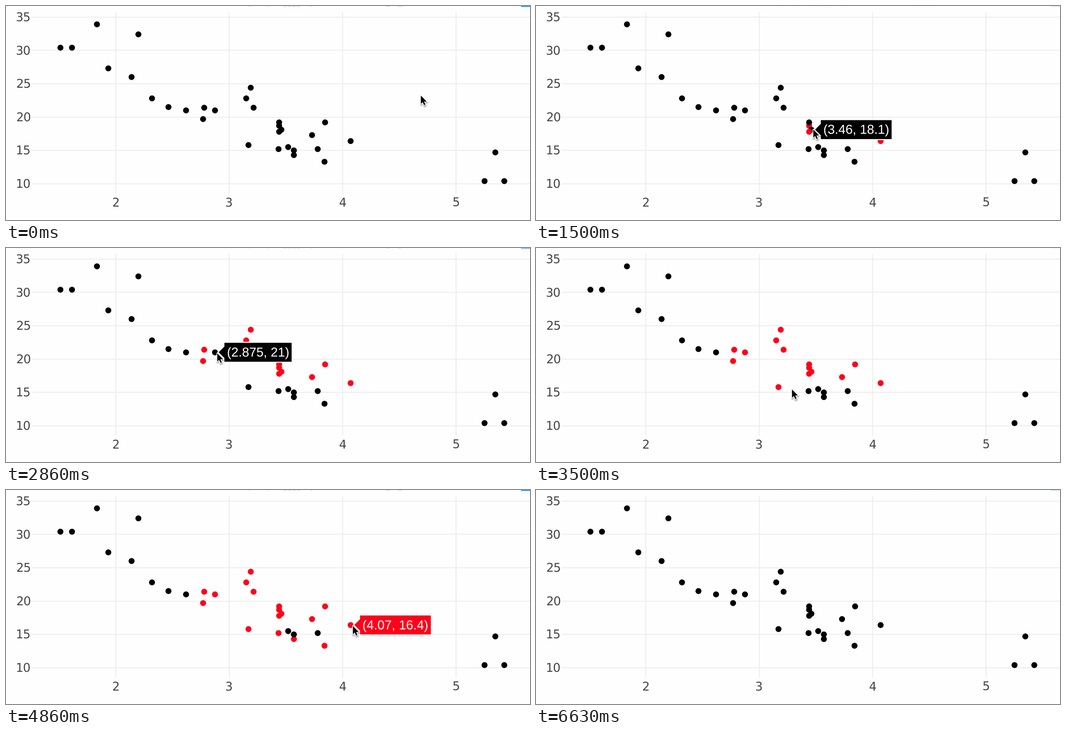
These frames come from a looping animation (1169x479 px, 6660 ms). A matplotlib script:

```python
import numpy as np
import matplotlib.pyplot as plt
from matplotlib.animation import FuncAnimation
from matplotlib.patches import Polygon, Rectangle

W, H, DPI = 1169, 479, 64
LOOP, STEP = 6660, 30
PT = 72 / DPI            # points per pixel
S = 2.21                 # screen pixels per chart unit
BG, GRID, INK, RED = "#fefefe", "#eeeeee", "#000000", "#ff001a"

plt.rcParams["text.hinting"] = "none"

# mtcars: weight, miles per gallon
WEIGHT = np.array([
    2.62, 2.875, 2.32, 3.215, 3.44, 3.46, 3.57, 3.19, 3.15, 3.44, 3.44,
    4.07, 3.73, 3.78, 5.25, 5.424, 5.345, 2.2, 1.615, 1.835, 2.465, 3.52,
    3.435, 3.84, 3.845, 1.935, 2.14, 1.513, 3.17, 2.77, 3.57, 2.78])
MPG = np.array([
    21, 21, 22.8, 21.4, 18.7, 18.1, 14.3, 24.4, 22.8, 19.2, 17.8,
    16.4, 17.3, 15.2, 10.4, 10.4, 14.7, 32.4, 30.4, 33.9, 21.5, 15.5,
    15.2, 13.3, 19.2, 27.3, 26, 30.4, 15.8, 19.7, 15, 21.4])
PX = 244.7 + 253.2 * (WEIGHT - 2)
PY = 397.9 - 14.93 * (MPG - 10)

# points visited at even steps between two times
TOUR = [(390, 700, [11, 24, 12]), (1150, 1890, [10, 4, 9, 5, 3, 8, 7]),
        (2440, 2540, [31, 29]), (2760, 3270, [1, 28]),
        (3705, 3820, [22, 6]), (4360, 4720, [23, 11])]
LAG, TRAVEL, REACH = 210, 360, 24
RESET, LEAVE, FADE = 5620, 6456, 300

REST, CORNER = (877, 225), (921, 191)
stops = [(30, (925.5, 200.5)), (160, REST), (300, REST)]
turns = {}
for start, end, points in TOUR:
    for t, i in zip(np.linspace(start, end, len(points)), points):
        stops.append((t, (PX[i] + 5, PY[i] + 2)))
        turns.setdefault(i, t + LAG)
stops += [(5230, CORNER), (6300, CORNER), (6450, (945, -32))]


def pointer_tip(t):
    """Wait at each stop, then glide so as to reach the next one on time."""
    here = np.array(stops[0][1])
    last = stops[0][0]
    for arrive, goal in stops[1:]:
        travel = min(arrive - last, TRAVEL)
        p = np.clip((t - arrive + travel) / travel, 0, 1)
        here = here + p * (np.array(goal) - here)
        if p < 1:
            break
        last = arrive
    return here


def ease(p):
    return 1 - (1 - np.clip(p, 0, 1)) ** 2


def toolbar_alpha(t):
    """The toolbar fades in again after every redraw."""
    if t >= LEAVE:
        return 1 - ease((t - LEAVE) / FADE)
    redraws = [r for r in (*turns.values(), RESET) if r <= t]
    return ease((t - max(redraws)) / FADE) if redraws else 1


fig = plt.figure(figsize=(W / DPI, H / DPI), dpi=DPI, facecolor=BG)
ax = fig.add_axes([0, 0, 1, 1])
ax.set_xlim(0, W)
ax.set_ylim(H, 0)
ax.axis("off")


def grid_line(xs, ys):
    ax.plot(xs, ys, color=GRID, lw=S * PT, solid_capstyle="butt", zorder=1)


def tick_label(x, y, value, align):
    ax.text(x, y, str(value), family="DejaVu Sans", size=12 * S * PT,
            color="#444444", ha=align, va="baseline")


for k in range(6):
    y = 397.9 - 74.65 * k
    grid_line((57.5, W), (y, y))
    tick_label(55.3, y + 9, 10 + 5 * k, "right")
for k in range(4):
    x = 244.7 + 253.2 * k
    grid_line((x, x), (12.5, 420))
    tick_label(x, 448.7, 2 + k, "center")


def toolbar_piece(x, width, height, color):
    return ax.add_patch(Rectangle((x, 0), width, height, color=color, lw=0))


# lower edge of the toolbar, cut off by the top of the stage
toolbar_piece(1148, 21, 2.5, "#f7f8fc")
icons = [toolbar_piece(x, width, 1.1, "#c4c4c4")
         for width, xs in [(3, (542, 582, 680)), (7, range(619, 650, 10)),
                           (9, (848, 874))] for x in xs]
icons.append(toolbar_piece(1149, 20, 1.6, "#119dff"))

dots = ax.scatter(PX, PY, s=(6 * S * PT) ** 2, c=INK, lw=0, zorder=3)

label_box = Polygon([(0, 0), (1, 1), (0, 1)], ec="white", lw=S * PT,
                    joinstyle="miter", zorder=4)
ax.add_patch(label_box)
label_text = ax.text(0, 0, "", family="Liberation Sans", size=13 * S * PT,
                     color="white", va="baseline", zorder=5)

ARROW = np.array([(0, 0), (0, 18.5), (4.2, 14.6), (7.2, 21.5),
                  (10.2, 20.2), (7.3, 13.6), (13, 13.2)])


def pointer_layer(color, alpha, width, offset, z):
    patch = Polygon(ARROW, fc=color, ec=color, alpha=alpha, lw=width * PT,
                    joinstyle="round", zorder=z)
    return ax.add_patch(patch), np.array(offset)


pointer = [pointer_layer("black", 0.07, w, (0.8, 2.6), 6) for w in (7, 5, 3, 1)]
pointer += [pointer_layer("white", 1, 3, (0, 0), 7),
            pointer_layer("black", 1, 0, (0, 0), 8)]


def text_width(text):
    em = {"(": 0.333, ")": 0.333, ".": 0.278, ",": 0.278, " ": 0.278}
    return 13 * S * sum(em.get(c, 0.556) for c in text)


def show_label(i, color):
    text = f"({WEIGHT[i]:g}, {MPG[i]:g})"
    x, y = PX[i] + 3 * S, PY[i] - 0.3
    a, h = 6 * S, 22.3
    left, right = x + a, x + 2 * a + text_width(text)
    label_box.set_xy([(x, y), (left, y + a), (left, y + h), (right, y + h),
                      (right, y - h), (left, y - h), (left, y - a)])
    label_box.set_facecolor(color)
    label_text.set_position((x + 9 * S, y + 9.8))
    label_text.set_text(text)


def update(frame):
    t = frame * STEP
    colors = [RED if turns.get(i, LOOP) <= t < RESET else INK
              for i in range(len(WEIGHT))]
    dots.set_facecolor(colors)

    tip = pointer_tip(t)
    for patch, offset in pointer:
        patch.set_xy(ARROW + tip + offset)

    distance = np.hypot(PX - tip[0], PY - tip[1])
    nearest = distance.argmin()
    hovering = distance[nearest] < REACH
    label_box.set_visible(hovering)
    label_text.set_visible(hovering)
    if hovering:
        show_label(nearest, colors[nearest])

    alpha = toolbar_alpha(t)
    for icon in icons:
        icon.set_alpha(alpha)
    return []


anim = FuncAnimation(fig, update, frames=LOOP // STEP, interval=STEP,
                     repeat=True, repeat_delay=0, blit=False)
plt.show()
```
